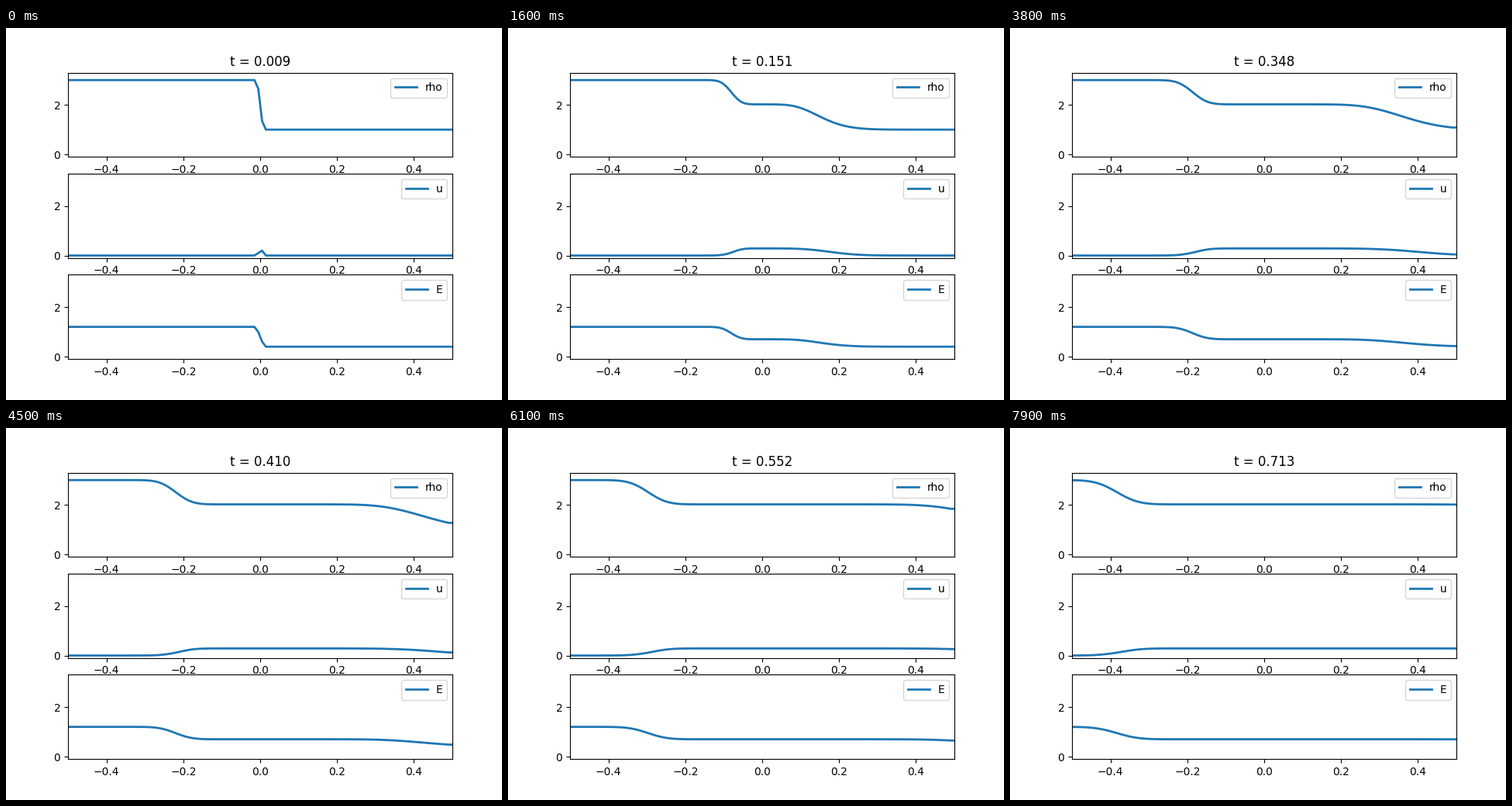
These frames come from a looping animation (640x480 px, 8 s). A matplotlib script:

```python
import numpy as np
import matplotlib.pyplot as plt
from matplotlib.animation import FuncAnimation

FRAMES = 80
N = 102
MID = N // 2
DT = 0.9 / (N - 1)
NU_LEFT, NU_RIGHT = 0.485, 0.493   # Courant numbers of the two waves

# Columns: density, momentum, energy
left = np.array([3.0, 0.0, 1.2])
right = np.array([1.0, 0.0, 0.4])
star = np.array([2.02, 2.02 * 0.285, 0.70])
start_left = np.array([0.36, 0.46, 0.42])
start_right = np.array([0.34, 0.46, 0.68])

x = np.linspace(-0.5, 0.5, N)


def solve():
    """Upwind both waves; the right-going one is swept in place."""
    a = np.zeros((N, 3))
    b = np.zeros((N, 3))
    a[:MID] = left - star
    b[MID:] = right - star
    a[MID - 1] *= 1 - start_left
    b[MID] *= 1 - start_right
    states = [star + a + b]
    for _ in range(FRAMES - 1):
        a[1:-1] += NU_LEFT * (a[2:] - a[1:-1])
        for i in range(1, N - 1):
            b[i] += NU_RIGHT * (b[i - 1] - b[i])
        for wave in (a, b):
            wave[0], wave[-1] = wave[1], wave[-2]
        states.append(star + a + b)
    return states


states = solve()

fig, axes = plt.subplots(3, 1, figsize=(6.4, 4.8), dpi=100)
lines = []
for ax, name in zip(axes, ("rho", "u", "E")):
    line, = ax.plot(x, np.zeros(N), lw=2, label=name)
    ax.set_xlim(-0.5, 0.5)
    ax.set_ylim(-0.1, 3.3)
    ax.legend(loc="upper right")
    lines.append(line)
title = axes[0].set_title("")


def update(k):
    rho, mom, energy = states[k].T
    for line, y in zip(lines, (rho, mom / rho, energy)):
        line.set_ydata(y)
    title.set_text(f"t = {(k + 1) * DT:.3f}")
    return lines + [title]


anim = FuncAnimation(fig, update, frames=FRAMES, interval=100,
                     repeat=True, repeat_delay=0, blit=False)
plt.show()
```
